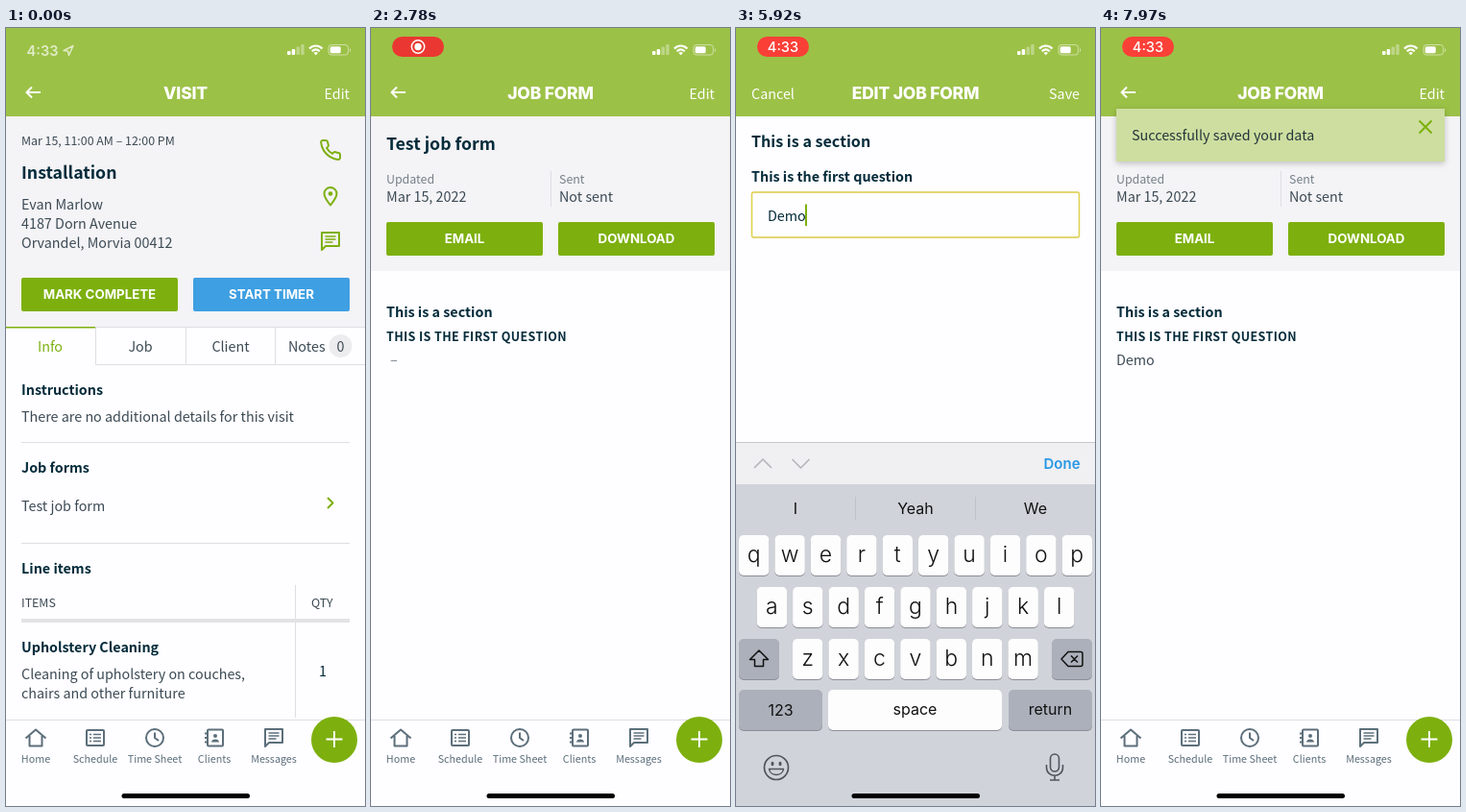
Recreate the animation shown at these times as an HTML page. Size 374 by 810 pixels, loop 8 s.

```html
<!DOCTYPE html>
<html lang="en">
<head>
<meta charset="utf-8">
<title>Job form</title>
<style>
html, body { margin: 0; width: 100%; height: 100%; overflow: hidden; background: #fefdff; }
svg.stage { display: block; width: 100vw; height: 100vh; }

text { font: 14.33px "Noto Sans CJK JP", "Noto Sans CJK SC", "Noto Sans CJK", "Noto Sans", sans-serif; fill: #3b4a54; }
.dark { fill: #032b3a; }
.h, .h2, .h3 { font-weight: 700; fill: #032b3a; }
.h2 { font-size: 17.7px; }
.h3 { font-size: 16.1px; }
.caps { font-size: 12.5px; letter-spacing: .4px; }
.small { font-size: 12.4px; }
.muted { fill: #75808a; }
.mid { text-anchor: middle; }
.end { text-anchor: end; }
.white { fill: #fff; }
.title, .button, .sys { font-family: Inter, Roboto, sans-serif; }
.title { font-size: 17.5px; font-weight: 800; letter-spacing: -.2px; fill: #fff; text-anchor: middle; }
.button { font-size: 13.3px; font-weight: 700; fill: #fff; text-anchor: middle; }
.sys { font-size: 16px; fill: #111; text-anchor: middle; }
.time { font-size: 14.6px; font-weight: 500; fill: #fff; }
.key { font-size: 23px; font-weight: 300; }
.tab { font-size: 10.75px; fill: #5c6f7b; text-anchor: middle; }
.line { fill: none; stroke: currentColor; stroke-width: 2; stroke-linejoin: round; }
.thin { fill: none; stroke: #dfdee3; }
.page { fill: #fefdff; }
.panel { fill: #f4f3f6; }
.green { fill: #7db00e; }
.head { fill: #9cc147; }
.accent { color: #7db00e; }
.slate { color: #5c6f7b; }

/* screens */
.visit, .job, .base, .edit, .keyboard, .toast, .oldTitle, .newTitle, .clock, .pill {
  animation: 8s cubic-bezier(.215, .61, .355, 1) infinite;
}
.visit { animation-name: visit; }
.job { animation-name: job; }
.oldTitle { animation-name: oldTitle; }
.newTitle { animation-name: newTitle; }
.base { animation-name: base; }
.edit { animation-name: edit; }
.keyboard { animation-name: keyboard; }
.toast { animation-name: toast; }
.clock { animation-name: clock; }
.pill { animation-name: pill; }
@keyframes visit { 0%, 23.1% { transform: none } 28.1%, 100% { transform: translateX(-112px) } }
@keyframes job { 0%, 23.1% { transform: translateX(374px) } 28.1%, 100% { transform: none } }
@keyframes oldTitle { 0%, 23.1% { opacity: 1 } 28.1%, 100% { opacity: 0 } }
@keyframes newTitle { 0%, 23.1% { opacity: 0 } 28.1%, 100% { opacity: 1 } }
@keyframes base {
  0%, 37.5% { transform: none }
  42.5%, 86.25% { transform: translateX(-112px) }
  90.6%, 100% { transform: none }
}
@keyframes edit {
  0%, 37.5% { transform: translateX(374px) }
  42.5%, 86.25% { transform: none }
  90.6%, 100% { transform: translateX(374px) }
}
@keyframes keyboard {
  0%, 55.25% { transform: translateY(379px) }
  59.625%, 77.25% { transform: none }
  81.625%, 100% { transform: translateY(379px) }
}
@keyframes toast {
  0%, 94.4% { transform: translateY(-20px); opacity: 0 }
  97.5%, 100% { transform: none; opacity: 1 }
}
@keyframes clock { 0% { opacity: .7 } 3.2%, 100% { opacity: 0 } }
@keyframes pill { 0%, 3.2% { opacity: 0 } 7.5%, 100% { opacity: 1 } }

/* recording indicator */
.pulse { animation: pulse 2s -1.8s ease-in-out infinite; }
@keyframes pulse { 0%, 100% { fill: #ff4239 } 50% { fill: #de302d } }

/* hard switches */
.d, .e, .m, .o, .focus, .cursor, .upper, .dash, .answer, .rec, .recTime { animation: 8s step-end infinite; }
.d, .lower { animation: d 8s step-end infinite; }
.e { animation-name: e; }
.m { animation-name: m; }
.o { animation-name: o; }
.upper { animation-name: upper; }
.focus { animation-name: focus; }
.cursor { animation-name: focus, cursor; }
.dash { animation-name: until80; }
.answer { animation-name: from80; }
.rec { animation-name: until45; }
.recTime { animation-name: from45; }
@keyframes d { 0% { opacity: 0 } 62%, 100% { opacity: 1 } }
@keyframes e { 0% { opacity: 0 } 65%, 100% { opacity: 1 } }
@keyframes m { 0% { opacity: 0 } 68%, 100% { opacity: 1 } }
@keyframes o { 0% { opacity: 0 } 71%, 100% { opacity: 1 } }
@keyframes upper { 0% { opacity: 1 } 62%, 100% { opacity: 0 } }
@keyframes focus { 0% { opacity: 0 } 55.25% { opacity: 1 } 77.25%, 100% { opacity: 0 } }
@keyframes cursor {
  0% { transform: translateX(-10px) }
  62% { transform: none }
  65% { transform: translateX(8px) }
  68% { transform: translateX(21px) }
  71%, 100% { transform: translateX(30px) }
}
@keyframes until80 { 0% { opacity: 1 } 80%, 100% { opacity: 0 } }
@keyframes from80 { 0% { opacity: 0 } 80%, 100% { opacity: 1 } }
@keyframes until45 { 0% { opacity: 1 } 45%, 100% { opacity: 0 } }
@keyframes from45 { 0% { opacity: 0 } 45%, 100% { opacity: 1 } }
</style>
</head>
<body>
<svg class="stage" viewBox="0 0 374 810">
  <defs>
    <g id="chat">
      <path class="line" d="M329 213h18v14h-14l-4 4z"/>
      <path class="line" style="stroke-width:1.5" d="M332.500 217h11M332.500 220h11M332.500 223h8"/>
    </g>
    <filter id="shadow" x="-10%" y="-20%" width="120%" height="160%">
      <feDropShadow dx="0" dy="2" stdDeviation="3" flood-opacity=".22"/>
    </filter>
  </defs>
  <rect class="page" width="374" height="810"/>
  <rect class="head" width="374" height="92"/>

  <g class="base">
    <g class="visit">
      <rect class="page" y="92" width="374" height="629"/>
      <rect class="panel" y="92" width="374" height="219"/>
      <text class="small" x="16" y="122">Mar 15, 11:00 AM – 12:00 PM</text>
      <text class="h2" x="16" y="157">Installation</text>
      <text x="16" y="189">Evan Marlow</text>
      <text x="16" y="209">4187 Dorn Avenue</text>
      <text x="16" y="229">Orvandel, Morvia 00412</text>
      <g class="accent">
        <path class="line" transform="translate(326 115)" d="M22 16.920v3a2 2 0 0 1-2.180 2 19.800 19.800 0 0 1-8.630-3.070 19.500 19.500 0 0 1-6-6 19.800 19.800 0 0 1-3.070-8.670A2 2 0 0 1 4.110 2h3a2 2 0 0 1 2 1.720 12.800 12.800 0 0 0 .7 2.810 2 2 0 0 1-.45 2.110L8.090 9.910a16 16 0 0 0 6 6l1.270-1.270a2 2 0 0 1 2.110-.45 12.800 12.800 0 0 0 2.810.7A2 2 0 0 1 22 16.920z"/>
        <path class="line" d="M338 184.500c-4-5-6.500-8.500-6.500-12a6.500 6.500 0 0 1 13 0c0 3.500-2.500 7-6.500 12z"/>
        <circle class="green" cx="338" cy="172.500" r="2.300"/>
        <use href="#chat"/>
        <path class="line" d="M335 489l5.500 5.500-5.500 5.500"/>
      </g>
      <rect class="green" x="16" y="260" width="163" height="35" rx="2"/>
      <rect x="195" y="260" width="163" height="35" rx="2" fill="#3e9fe2"/>
      <text class="button" x="97.500" y="282">MARK COMPLETE</text>
      <text class="button" x="276.500" y="282">START TIMER</text>

      <path class="thin" d="M93 311.500h281M93.500 311v39.500h281M187.500 311v39M280.500 311v39"/>
      <rect class="green" y="311" width="93" height="1.500"/>
      <text class="mid" x="46" y="337" style="fill:#7db00e">Info</text>
      <text class="mid" x="140" y="337">Job</text>
      <text class="mid" x="234" y="337">Client</text>
      <text x="294" y="337">Notes</text>
      <circle cx="348.500" cy="331" r="12" fill="#ecebee"/>
      <text class="mid" x="348.500" y="337">0</text>

      <text class="h" x="16" y="382">Instructions</text>
      <text x="16" y="410">There are no additional details for this visit</text>
      <text class="h" x="16" y="463">Job forms</text>
      <text x="16" y="503">Test job form</text>
      <text class="h" x="16" y="568">Line items</text>
      <text class="small" x="16" y="603">ITEMS</text>
      <text class="small" x="318" y="603">QTY</text>
      <path class="thin" d="M16 431.500h342M16 536.500h342M301.500 580v138"/>
      <rect x="16" y="615" width="342" height="4" fill="#e3e2e5"/>
      <text class="h" x="16" y="650">Upholstery Cleaning</text>
      <text x="16" y="678">Cleaning of upholstery on couches,</text>
      <text x="16" y="698">chairs and other furniture</text>
      <text class="mid dark" x="330" y="675">1</text>
    </g>

    <g class="job">
      <rect class="page" y="92" width="374" height="629"/>
      <rect class="panel" y="92" width="374" height="161"/>
      <text class="h2" x="16" y="127">Test job form</text>
      <text class="small muted" x="16" y="162">Updated</text>
      <text class="small muted" x="196" y="162">Sent</text>
      <text x="16" y="181">Mar 15, 2022</text>
      <text x="196" y="181">Not sent</text>
      <path class="thin" d="M187.500 149v37"/>
      <rect class="green" x="16" y="202" width="163" height="35" rx="2"/>
      <rect class="green" x="195" y="202" width="163" height="35" rx="2"/>
      <text class="button" x="97.500" y="224">EMAIL</text>
      <text class="button" x="276.500" y="224">DOWNLOAD</text>
      <text class="h" x="16" y="301">This is a section</text>
      <text class="h caps" x="16" y="326">THIS IS THE FIRST QUESTION</text>
      <text class="muted dash" x="20" y="351">–</text>
      <text class="answer" x="16" y="351">Demo</text>
    </g>

    <text class="title oldTitle" x="187" y="74">VISIT</text>
    <text class="title newTitle" x="187" y="74">JOB FORM</text>
    <path class="line" color="#fff" d="M36 67H21.500M27 61.500l-5.500 5.500 5.500 5.500"/>
    <text class="white end" x="358" y="74">Edit</text>

    <rect class="page" y="721" width="374" height="89"/>
    <path class="thin" d="M0 720.500h374"/>
    <g class="slate">
      <path class="line" d="M20.500 739.500l10.500-9 10.500 9M24.500 737v10.500h13V737"/>
      <rect class="line" x="84" y="731" width="18" height="16" rx="1"/>
      <path class="line" style="stroke-width:1.700" d="M87 735.500h2M91 735.500h8M87 739h2M91 739h8M87 742.500h2M91 742.500h8"/>
      <circle class="line" cx="155" cy="739" r="9"/>
      <path class="line" d="M155 733.500v5.500l4 3"/>
      <rect class="line" x="210" y="730.500" width="16" height="17" rx="1"/>
      <path class="line" d="M207 734.500h4M207 739h4M207 743.500h4"/>
      <circle cx="218" cy="737" r="2" fill="currentColor"/>
      <path d="M214 743.500c0-4 8-4 8 0z" fill="currentColor"/>
      <use href="#chat" x="-59" y="517"/>
    </g>
    <text class="tab" x="31" y="765">Home</text>
    <text class="tab" x="93" y="765">Schedule</text>
    <text class="tab" x="155" y="765">Time Sheet</text>
    <text class="tab" x="217" y="765">Clients</text>
    <text class="tab" x="279" y="765">Messages</text>
    <circle class="green" cx="342" cy="741" r="24"/>
    <path class="line" color="#fff" d="M333.500 740.500h17M342 732v17"/>
  </g>

  <g class="edit">
    <rect class="page" width="374" height="810"/>
    <rect class="head" width="374" height="92"/>
    <text class="white" x="16" y="74">Cancel</text>
    <text class="title" x="187" y="74">EDIT JOB FORM</text>
    <text class="white end" x="358" y="74">Save</text>
    <text class="h3" x="16" y="124">This is a section</text>
    <text class="h" x="16" y="160">This is the first question</text>
    <rect class="thin" x="16.500" y="171" width="341" height="47" rx="2"/>
    <rect class="line focus" color="#e0d04a" style="stroke-width:1.500" x="16.500" y="171" width="341" height="47" rx="2"/>
    <text class="dark d" x="33" y="200.500">D</text>
    <text class="dark e" x="42.800" y="200.500">e</text>
    <text class="dark m" x="50.800" y="200.500">m</text>
    <text class="dark o" x="64" y="200.500">o</text>
    <rect class="green cursor" x="42" y="183.500" width="2" height="22.500"/>
  </g>

  <g class="keyboard">
    <rect y="431" width="374" height="379" fill="#d1d3da"/>
    <rect y="431" width="374" height="44" fill="#f0eff2"/>
    <path d="M0 431.500h374" stroke="#c8c8cc"/>
    <path class="line" color="#b5b7bc" style="stroke-width:1.700" d="M19 458l9-9 9 9M58.500 449l9 9 9-9"/>
    <text class="sys" x="339.500" y="459" style="fill:#2797e4;font-weight:600;font-size:15px">Done</text>
    <text class="sys" x="62" y="506">I</text>
    <text class="sys" x="187" y="506">Yeah</text>
    <text class="sys" x="312" y="506">We</text>
    <path d="M124.500 488v24M249.500 488v24" stroke="#bfc1c7"/>
    <g id="keys"></g>
    <path class="upper" d="M24 648l-9.500 9.500h5v7h9v-7h5z"/>
    <path class="line lower" color="#111" style="stroke-width:1.500" d="M24 648l-9.500 9.500h5v7h9v-7h5z"/>
    <path class="line" color="#111" style="stroke-width:1.500" d="M339 657l7-7.500h13a2 2 0 0 1 2 2v11a2 2 0 0 1-2 2h-13zM349 653.500l7 7M356 653.500l-7 7"/>
    <text class="sys" x="46.500" y="716">123</text>
    <text class="sys" x="186.500" y="715">space</text>
    <text class="sys" x="327.500" y="715">return</text>
    <g color="#50555c">
      <circle class="line" cx="42" cy="770" r="12.500" style="stroke-width:1.700"/>
      <ellipse cx="38" cy="766" rx="1.500" ry="2.300" fill="currentColor"/>
      <ellipse cx="46" cy="766" rx="1.500" ry="2.300" fill="currentColor"/>
      <path class="line" style="stroke-width:1.500" d="M34.500 771.500h15c-1 8-14 8-15 0z"/>
      <rect class="line" x="327.500" y="756" width="9" height="18" rx="4.500" style="stroke-width:1.600"/>
      <path class="line" style="stroke-width:1.600" d="M323.500 767v3c0 11 17 11 17 0v-3M332 778.500v4.500M327 783h10"/>
    </g>
  </g>

  <g class="toast">
    <rect x="16" y="84" width="342" height="55" fill="#cddea0" filter="url(#shadow)"/>
    <text x="32" y="117" style="fill:#25343b">Successfully saved your data</text>
    <path class="line accent" d="M331.500 96.500l13 13M344.500 96.500l-13 13"/>
  </g>

  <g class="clock">
    <text class="sys time" x="38" y="28.500" style="font-weight:600">4:33</text>
    <path class="line" color="#fff" style="stroke-width:1.400" d="M60 23.500l10-5-4.500 10-1-4.500z"/>
  </g>
  <g class="pill">
    <rect class="pulse" x="22" y="9" width="54" height="21" rx="10.500"/>
    <g class="rec" color="#fff">
      <circle class="line" cx="49" cy="19.500" r="6.700" style="stroke-width:1.500"/>
      <circle class="white" cx="49" cy="19.500" r="3.700"/>
    </g>
    <text class="sys time recTime" x="49" y="24.500">4:33</text>
  </g>

  <g class="white" color="#fff">
    <rect x="293" y="24" width="3.500" height="4" rx="1"/>
    <rect x="297.700" y="22" width="3.500" height="6" rx="1"/>
    <rect x="302.500" y="19.500" width="3.500" height="8.500" rx="1" opacity=".35"/>
    <rect x="307.200" y="17" width="3.500" height="11" rx="1" opacity=".35"/>
    <path class="line" style="stroke-width:2.200" d="M316 21.500c4-4 9.500-4 13.500 0M318.700 24.300c2.500-2.400 5.600-2.400 8.100 0"/>
    <path d="M320.500 26c1.500-1.300 3-1.300 4.500 0l-2.250 2.300z"/>
    <rect class="line" x="336" y="17.500" width="20.500" height="10.500" rx="3" style="stroke-width:1" opacity=".5"/>
    <rect x="337.700" y="19.200" width="11" height="7.100" rx="1.500"/>
    <path d="M358 21v4c1.600-.6 1.600-3.400 0-4z" opacity=".5"/>
  </g>
  <rect x="120.500" y="797" width="133.500" height="5" rx="2.500"/>
</svg>
<script>
const LIGHT = "#fdfdfe", GREY = "#abb0ba";
const cap = (x, y, width, fill) =>
  `<rect x="${x}" y="${y + 1}" width="${width}" height="42" rx="5" fill="#8b8e95"/>
   <rect x="${x}" y="${y}" width="${width}" height="42" rx="5" fill="${fill}"/>`;
const letter = (char, x, y, kind) => `<text class="sys key ${kind}" x="${x}" y="${y}">${char}</text>`;

const rows = [["qwertyuiop", 3, 528], ["asdfghjkl", 21.7, 582], ["zxcvbnm", 59, 636]];
const letters = rows.flatMap(([chars, left, y]) => [...chars].map((char, i) => {
  const x = left + 37.4 * i;
  return cap(x, y, 31.4, LIGHT)
    + letter(char, x + 15.7, y + 28, "lower")
    + letter(char.toUpperCase(), x + 15.7, y + 29, "upper");
}));
const wide = [
  cap(3, 636, 42, GREY), cap(329, 636, 42, GREY),
  cap(3, 689, 87, GREY), cap(96, 689, 181, LIGHT), cap(284, 689, 87, GREY),
  `<rect class="upper" x="3" y="636" width="42" height="42" rx="5" fill="${LIGHT}"/>`
];
document.getElementById("keys").innerHTML = [...letters, ...wide].join("");
</script>
</body>
</html>
```
